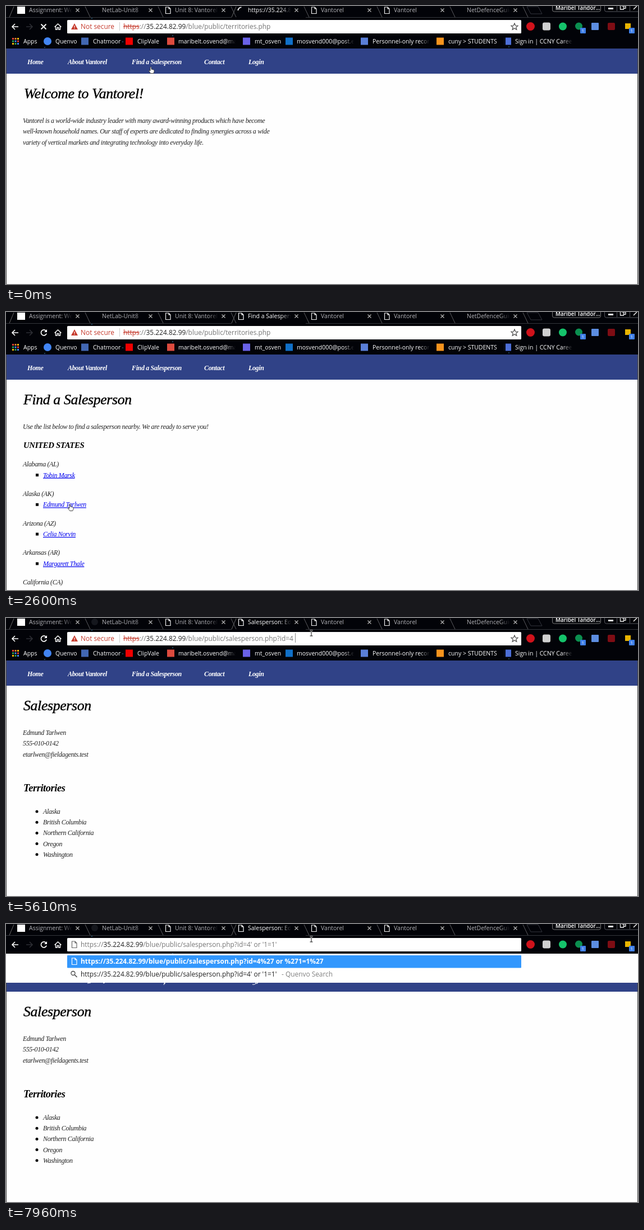
These frames come from a looping animation (1126x497 px, 8000 ms). An HTML page:

```html
<!DOCTYPE html>
<html lang="en">
<head>
<meta charset="utf-8">
<title>Browser session</title>
<style>
  html, body { margin: 0; width: 100%; height: 100%; overflow: hidden; background: #fefefe; }
  svg { display: block; }
  text { white-space: pre; }
  .ui { font: 10.5px 'Open Sans', 'Noto Sans', sans-serif; }
  .url { font: 11.9px 'Open Sans', 'Noto Sans', sans-serif; }
  .page { font: italic 12px 'Liberation Serif', serif; letter-spacing: -.03em; fill: #222; }
  .page .h1 { font-size: 25.8px; fill: #000; stroke: #000; stroke-width: .4; }
  .page .h2 { font-size: 18.3px; font-weight: bold; fill: #000; }
  .page .caps { font-size: 14.8px; font-weight: bold; fill: #000; }
  .page .nav { font-weight: bold; fill: #fff; }
  .page .link { fill: #00e; text-decoration: underline; }
</style>
</head>
<body>
<script>
const LOOP = 8000;
const HOST = '35.224.82.99';
const SALES = '/blue/public/salesperson.php?id=4';
const TYPED = SALES + "' or '1=1'";

const text = (x, y, s, attr = '') => `<text x="${x}" y="${y}" ${attr}>${s}</text>`;
const box = (x, y, w, h, fill, r = 0) =>
  `<rect x="${x}" y="${y}" width="${w}" height="${h}" rx="${r}" fill="${fill}"/>`;
const dot = (x, y, r, fill) => `<circle cx="${x}" cy="${y}" r="${r}" fill="${fill}"/>`;
const line = (d, color, w = 1) => `<path d="${d}" fill="none" stroke="${color}" stroke-width="${w}"/>`;
// Visible during the listed [start, end) pairs of milliseconds
const during = (times, s) => `<g data-t="${times}">${s}</g>`;
// Text cut at width w with a fade to the dark bar
const faded = (x, y, w, s, color) =>
  `<svg x="${x}" y="${y - 12}" width="${w}" height="17">${text(0, 12, s, `fill="${color}"`)}
   <rect x="${w - 18}" width="18" height="17" fill="url(#fade)"/></svg>`;
const sheet = (x, y, color) =>
  line(`M${x} ${y}h5.5l3 3v8.5h-8.5zM${x + 5.5} ${y}v3h3`, color, 1.2);

function tabs() {
  const titles = ['Assignment: We', 'NetLab-Unit8', 'Unit 8: Vantorel', '', 'Vantorel', 'Vantorel', 'NetDefenceGuide'];
  let s = line('M6 20L14 1M402 20L410 1', '#666') + line('M0 20.5H402M534 20.5H1126', '#34363c');
  titles.forEach((title, i) => {
    const x = 130 * i, end = x + 127.5;
    s += line(`M${x + 141} 1L${x + 150} 20`, '#5c5c60');
    s += line(`M${end - 3} 4.5l6 6m0 -6l-6 6`, '#bbb', 1.1);
    s += faded(x + 41, 11, 77, title, '#b4b4b8');
    if ([2, 4, 5].includes(i)) s += sheet(x + 24.5, 2, '#eee');
  });
  s += box(20, 1, 14, 13, '#fff');
  s += during('4130 8000', dot(158, 7, 6, '#15171d'));
  const active = [
    ['0 690 3270 3420', 'https://35.224.82.99'],
    ['690 3270', 'Find a Salesperson'],
    ['3420 8000', 'Salesperson: Edmund']
  ];
  for (const [times, title] of active) s += during(times, faded(431, 11, 77, title, '#fff'));
  s += during('1510 3120 3700 8000', sheet(414.5, 2, '#fff'));
  s += during('0 1510 3120 3700',
    '<circle id="spin" cx="419" cy="8" r="5.6" fill="none" stroke="#fff" stroke-width="1.8"/>');
  s += line('M928 1l7 13h20l-7 -13z', '#33353d');
  s += '<path d="M973.5 -2v9q0 3 3 3h80q3 0 3 -3v-9z" fill="#08090d" stroke="#777"/>';
  s += text(979, 7, 'Maribel Tandor...', 'fill="#fff" font-size="9.8" font-weight="600"');
  s += line('M1066.5 0v7q0 3 3 3H1126M1088.5 0v9M1111.5 0v9', '#55565c');
  s += box(1073, 3, 9, 3, '#eee') + line('M1094.5 0v6h6v-6M1097 0h7v4h-3', '#eee', 1.3);
  s += line('M1118 6l6 -6', '#eee', 1.5);
  return s;
}

function address(x, path, color = '') {
  const gray = color || '#767676', dark = color || '#222';
  return `<text x="${x}" y="41" fill="${gray}">` +
    `<tspan fill="${color || '#c5392b'}" text-decoration="line-through">https</tspan>` +
    `://<tspan fill="${dark}">${HOST}</tspan>${path}</text>`;
}

function toolbar() {
  let s = line('M22 37H11.5M16 32l-5 5l5 5', '#fff', 1.6) + line('M36 37h11M42 32l5 5l-5 5', '#2d2e34', 1.6);
  s += during('0 1510 3120 3700', line('M62.5 32.5l9 9m0 -9l-9 9', '#fff', 1.8));
  s += during('1510 3120 3700 8000',
    line('M71.5 34a5 5 0 1 0 .7 4.5', '#fff', 1.7) + '<path d="M73 31v5h-5z" fill="#fff"/>');
  s += line('M86.5 37.5l6 -5.5l6 5.5M88.5 36.5v5.5h2.8v-3.5h2.4v3.5h2.8v-5.5', '#fff', 1.4);
  s += box(109, 25, 809, 24, '#fff', 1.5);
  s += '<g class="url">';
  s += during('0 7500',
    '<path d="M122 31l6 11h-12z" fill="#c5392b"/>' + box(121.4, 35, 1.2, 3.5, '#fff') + box(121.4, 39.4, 1.2, 1.2, '#fff') +
    text(133, 41, 'Not secure', 'fill="#c5392b"') + box(202, 29, 1, 15, '#ccc') +
    line('M906 31l1.7 4 4.3 .3-3.3 2.8 1.1 4.2-3.8-2.3-3.8 2.3 1.1-4.2-3.3-2.8 4.3-.3z', '#444', 1.2));
  s += during('0 3270', address(209, '/blue/public/territories.php'));
  s += during('3270 5730 6290 7500', address(209, SALES));
  s += during('5730 6290', box(209, 27, 307, 18, '#3297fd') + address(209, SALES, '#fff'));
  s += during('5610 5730 6290 6690 7370 7500', box(515, 27, 1, 17, '#888'));
  s += during('7500 8000', sheet(117.5, 31, '#666') +
    text(133, 41, `https://<tspan fill="#222">${HOST}</tspan>${TYPED}`, 'fill="#767676"'));
  s += during('7500 7960', box(488, 27, 1, 17, '#333'));
  s += '</g>';

  const badge = x => box(x - 5, 39, 10, 10, '#3f7fe8', 1) + text(x - 2.5, 47, '1', 'fill="#fff" font-size="8"');
  s += dot(934.5, 36.5, 7.5, '#d0121b');
  s += `<g id="ext">${box(956, 29.5, 14, 14, '#d0d0d0', 3)}</g>`;
  s += dot(992, 36.5, 7, '#15c36b') + dot(1020.5, 36, 6.5, '#0b8f50') + badge(1028);
  s += box(1043, 30, 13, 13, '#5c8de0', 1) + box(1072, 30, 13, 13, '#7e0d14', 2);
  s += box(1103, 31, 10, 10, '#e8b400') + badge(1115);
  return s;
}

function bookmarks() {
  let s = '';
  const grid = ['#e94335', '#f5812a', '#fbbc05', '#34a853', '#4285f4', '#e94335', '#fbbc05', '#34a853', '#4285f4'];
  grid.forEach((c, i) => s += box(11 + i % 3 * 4.5, 57 + Math.floor(i / 3) * 4.5, 3, 3, c));
  s += dot(74, 63, 7, '#4285f4');
  [[134, '#4267b2'], [213, '#f00000'], [287, '#dd4b3e'], [422, '#6a62e8'],
   [498, '#1070c8'], [632, '#5a7fd8'], [767, '#f7941d'], [887, '#4d6fd8']]
    .forEach(([x, c]) => s += box(x, 56.5, 13, 13, c));
  const labels = [[31, 'Apps'], [88, 'Quenvo'], [155, 'Chatmoor'], [234, 'ClipVale'],
    [307, 'maribelt.osvend@mail'], [443, 'mt_osven'], [518, 'mosvend000@post.example'],
    [653, 'Personnel-only records'], [788, 'cuny &gt; STUDENTS'], [907, 'Sign in | CCNY Career']];
  for (const [x, label] of labels) s += faded(x, 67, 102, label, '#fff');
  return s;
}

function content() {
  let s = box(0, 76, 1126, 421, '#fefefe') + box(0, 76, 1126, 45, '#304287');
  s += box(0, 76, 1, 421, '#444') + box(1125, 76, 1, 421, '#444');
  [[38, 'Home'], [110, 'About Vantorel'], [224, 'Find a Salesperson'], [353, 'Contact'], [432, 'Login']]
    .forEach(([x, t]) => s += text(x, 104, t, 'class="nav"'));

  s += during('0 1510', text(32, 165, 'Welcome to Vantorel!', 'class="h1"') + [
    'Vantorel is a world-wide industry leader with many award-winning products which have become',
    'well-known household names. Our staff of experts are dedicated to finding synergies across a wide',
    'variety of vertical markets and integrating technology into everyday life.'
  ].map((t, i) => text(30, 209 + i * 19.3, t)).join(''));

  const people = [['Alabama (AL)', 'Tobin Marsk'], ['Alaska (AK)', 'Edmund Tarlwen'],
    ['Arizona (AZ)', 'Celia Norvin'], ['Arkansas (AR)', 'Margarett Thale'], ['California (CA)', 'Sheldrin Pawle']];
  s += during('1510 3420', text(31, 165, 'Find a Salesperson', 'class="h1"') +
    text(30, 209, 'Use the list below to find a salesperson nearby. We are ready to serve you!') +
    text(31, 243, 'UNITED STATES', 'class="caps"') +
    people.map(([state, name], i) => {
      const y = 276 + i * 52.8;
      return text(30, y, state) + box(53, y + 13, 5, 5, '#000') + text(66, y + 19.5, name, 'class="link"');
    }).join(''));

  s += during('3420 8000', text(31, 165, 'Salesperson', 'class="h1"') +
    ['Edmund Tarlwen', '555-010-0142', 'etarlwen@fieldagents.test']
      .map((t, i) => text(30, 209 + i * 19.3, t)).join('') +
    text(31, 310, 'Territories', 'class="h2"') +
    ['Alaska', 'British Columbia', 'Northern California', 'Oregon', 'Washington']
      .map((t, i) => dot(55, 346 + i * 19.2, 2.5, '#000') + text(66, 350 + i * 19.2, t)).join(''));
  return s;
}

function suggestions() {
  return during('7500 8000', box(0, 53, 1126, 52, '#fff') + box(109, 56, 809, 22.5, '#3297fd', 1) +
    line('M145 106l6 -1M173 106l3 -1M281 109l2 -4M439 108q5 1 7 -3', '#fff') +
    sheet(117.5, 61, '#fff') +
    `<g class="url">${text(133, 71, `https://${HOST}${SALES}%27 or %271=1%27`, 'fill="#fff" font-weight="bold"')}
     ${text(133, 94, `https://${HOST}${TYPED}`, 'fill="#222"')}
     ${text(491, 94, '- Quenvo Search', 'fill="#808080"')}</g>` +
    '<circle cx="119.5" cy="88" r="3.5" fill="none" stroke="#444" stroke-width="1.3"/>' +
    line('M122 90.5l4.5 4.5', '#444', 1.5));
}

const cursors = {
  arrow: '<path d="M.5 .5v10l2.3 -2.1 1.5 3 1.3 -.6 -1.4 -3h2.6z" fill="#fff" stroke="#333" stroke-width=".9"/>',
  hand: '<path d="M3 8V1.5q1 -1.3 2 0v3.5l4 1q1 .3 1 1.5v2l-1.3 3h-5l-3.2 -4.5q0 -1.5 1.5 -.5z" fill="#fff" stroke="#333" stroke-width=".9"/>',
  beam: line('M.5 .5h5M.5 10h5M3 .5v9.5', '#fff', 2) + line('M.5 .5h5M.5 10h5M3 .5v9.5', '#111')
};

document.body.innerHTML = `<svg width="100%" height="100%" viewBox="0 0 1126 497" preserveAspectRatio="none">
  <defs><linearGradient id="fade">
    <stop stop-color="#020308" stop-opacity="0"/><stop offset="1" stop-color="#020308"/>
  </linearGradient></defs>
  <g class="ui">${box(0, 0, 1126, 76, '#020308')}
    ${[[69, 74], [153, 22], [208, 64], [297, 53], [896, 73]].map(([x, y]) => dot(x, y, 1, '#2b5a78')).join('')}
    ${tabs()}${toolbar()}${bookmarks()}</g>
  <g class="page">${content()}</g>
  ${suggestions()}
  <g id="cursor">${Object.entries(cursors).map(([k, s]) => `<g id="${k}">${s}</g>`).join('')}</g>
</svg>`;

const moves = [
  [0, 254, 108, 'hand'], [570, 252, 114, 'hand'], [690, 249, 121, 'arrow'], [810, 244, 127, 'arrow'],
  [960, 215, 200, 'arrow'], [1080, 186, 268, 'arrow'], [1230, 181, 310, 'arrow'], [1360, 179, 319, 'arrow'],
  [1900, 167, 322, 'arrow'], [2040, 123, 352, 'hand'], [2190, 115, 362, 'hand'], [2320, 110, 353, 'hand'],
  [2470, 110, 348, 'hand'], [2600, 110, 343, 'hand'],
  [4130, 200, 300, 'arrow'], [4250, 420, 170, 'arrow'], [4370, 600, 60, 'arrow'], [4490, 657, 5, 'arrow'],
  [4610, 549, 20, 'beam'], [4760, 548, 22, 'beam'], [5040, 543, 18, 'beam'], [5180, 541, 20, 'beam'], [5330, 541, 22, 'beam']
];
const timed = [...document.querySelectorAll('[data-t]')].map(node => [node, node.dataset.t.split(' ').map(Number)]);
const el = id => document.getElementById(id);
const between = (t, a, b) => t >= a && t < b;

function draw(now) {
  const t = now % LOOP;
  for (const [node, times] of timed) {
    const shown = times.some((start, i) => i % 2 === 0 && between(t, start, times[i + 1]));
    node.style.display = shown ? '' : 'none';
  }
  const [, x, y, kind] = moves.filter(m => m[0] <= t).pop();
  el('cursor').setAttribute('transform', `translate(${x} ${y})`);
  for (const k in cursors) el(k).style.display = k === kind ? '' : 'none';

  // A short arc turns backwards while waiting, a long one forwards while loading
  const waiting = t < 690 || between(t, 3120, 3420);
  const step = Math.floor(t / 130);
  const angle = waiting ? 180 - step * 45 : (step - 27) * 60;
  el('spin').setAttribute('stroke-dasharray', waiting ? '9 27' : '28 8');
  el('spin').setAttribute('transform', `rotate(${angle} 419 8)`);
  el('ext').style.opacity = between(t, 1230, 1360) || between(t, 3270, 3420) ? .5 : 1;
}

const began = performance.now();
function frame() {
  draw(Math.max(0, performance.now() - began));
  requestAnimationFrame(frame);
}
frame();
</script>
</body>
</html>
```
